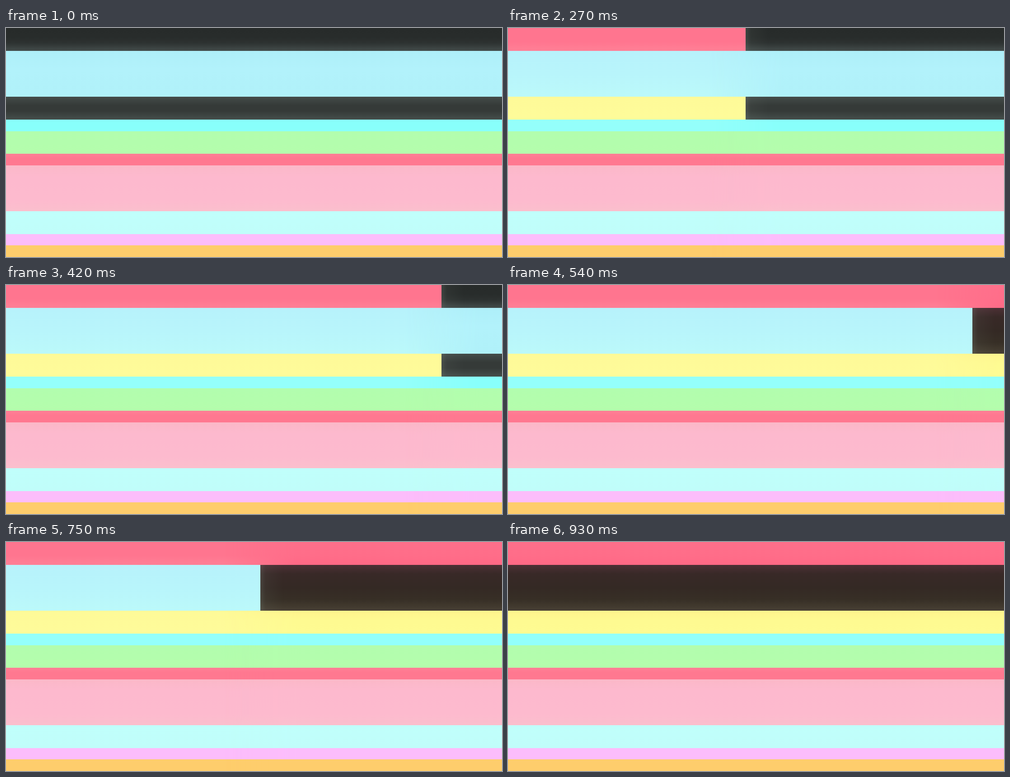
These frames come from a looping animation (1098x510 px, 1090 ms). An HTML page:

```html
<!DOCTYPE html>
<html lang="en">
<head>
<meta charset="utf-8">
<title>Stripes</title>
<style>
  html, body { margin: 0; width: 100%; height: 100%; overflow: hidden; }
  .scene, .band { position: absolute; left: 0; width: 1098px; }
  .scene { top: 0; height: 510px; overflow: hidden; }
  .soft {
    --mask: linear-gradient(90deg, transparent calc(var(--x) - 80px), #000 calc(var(--x) + 80px));
    -webkit-mask-image: var(--mask);
    mask-image: var(--mask);
  }
  .hard { left: var(--edge); overflow: hidden; }
  .hard::before {
    content: "";
    position: absolute;
    inset: 0;
    background: linear-gradient(90deg, rgba(120, 132, 122, .28), rgba(120, 132, 122, .09) 12px, transparent 50px);
    opacity: var(--glow);
  }
</style>
</head>
<body>
<script>
const WIDTH = 1098, LOOP = 1090, STEP = 30, FADE = 100;
const EDGES = [0, 51, 153, 204, 230, 280, 306, 408, 459, 484, 510];

// Stripes that look the same in every scene
const LOWER = [
  '#b2fdae, #b4fdac',
  '#ff8096, #ff7890 40%, #ff7890',
  '#fbb8c8, #fdb9ce 25%, #fdbace 75%, #fbbfcd',
  '#c0fffb, #c0fdfa',
  '#fcbdfb, #fcbdfb',
  '#fecd6c, #fecd6c'
];

const START = [
  '#272b2a, #282c2b 40%, #2d3231 65%, #434c4b',
  '#aeeff9, #b2f2fb 40%, #b0f1f9',
  '#444c49, #353a38 38%, #353a38 62%, #454e4b',
  '#88fffb, #88fffb'
];
const FILLED = [
  '#ff758f, #ff758f 60%, #ff8096',
  '#b7f2fb, #b8f5fb 50%, #bbf9fa',
  '#fefa98, #fefb9a',
  '#94fffb, #94fffb'
];
const EMPTY = [
  '#ff6f8a, #ff6d89 60%, #ff6885',
  '#4c3035, #382927 20%, #342924 50%, #372f26 76%, #484034',
  '#fef48d, #fefa91 45%, #fefb92',
  '#92fffb, #92fffb'
];

// [time in ms, position of the wipe edge]
const GROW = [[30, 0], [60, 24], [90, 88], [120, 154], [270, 526], [420, 964], [450, WIDTH]];
const SHRINK = [[510, WIDTH], [540, 1028], [570, 961], [660, 761], [840, 365], [870, 276], [900, 158], [930, 0]];

function makeScene(upper, hardBands) {
  const scene = document.createElement('div');
  scene.className = 'scene';
  [...upper, ...LOWER].forEach((stops, i) => {
    const band = document.createElement('div');
    band.className = 'band';
    if (hardBands) band.classList.add(hardBands.includes(i) ? 'hard' : 'soft');
    band.style.top = EDGES[i] + 'px';
    band.style.height = EDGES[i + 1] - EDGES[i] + 'px';
    band.style.backgroundImage = `linear-gradient(${stops})`;
    scene.append(band);
  });
  document.body.append(scene);
  return scene;
}

function valueAt(track, t) {
  const next = track.findIndex(([time]) => time > t);
  if (next === 0) return track[0][1];
  if (next < 0) return track[track.length - 1][1];
  const [t0, a] = track[next - 1], [t1, b] = track[next];
  return Math.round(a + (b - a) * (t - t0) / (t1 - t0));
}

function wipe(scene, x) {
  const softX = x <= 0 ? -FADE : x >= WIDTH ? WIDTH + FADE : x;
  scene.style.setProperty('--edge', x + 'px');
  scene.style.setProperty('--x', softX + 'px');
  scene.style.setProperty('--glow', x > 0 ? 1 : 0);
}

makeScene(FILLED);
const start = makeScene(START, [0, 2]);
const empty = makeScene(EMPTY, [1]);

function draw(now) {
  const t = Math.floor((now % LOOP) / STEP) * STEP;
  wipe(start, valueAt(GROW, t));
  wipe(empty, valueAt(SHRINK, t));
}

function tick() {
  draw(performance.now());
  requestAnimationFrame(tick);
}
tick();
</script>
</body>
</html>
```
